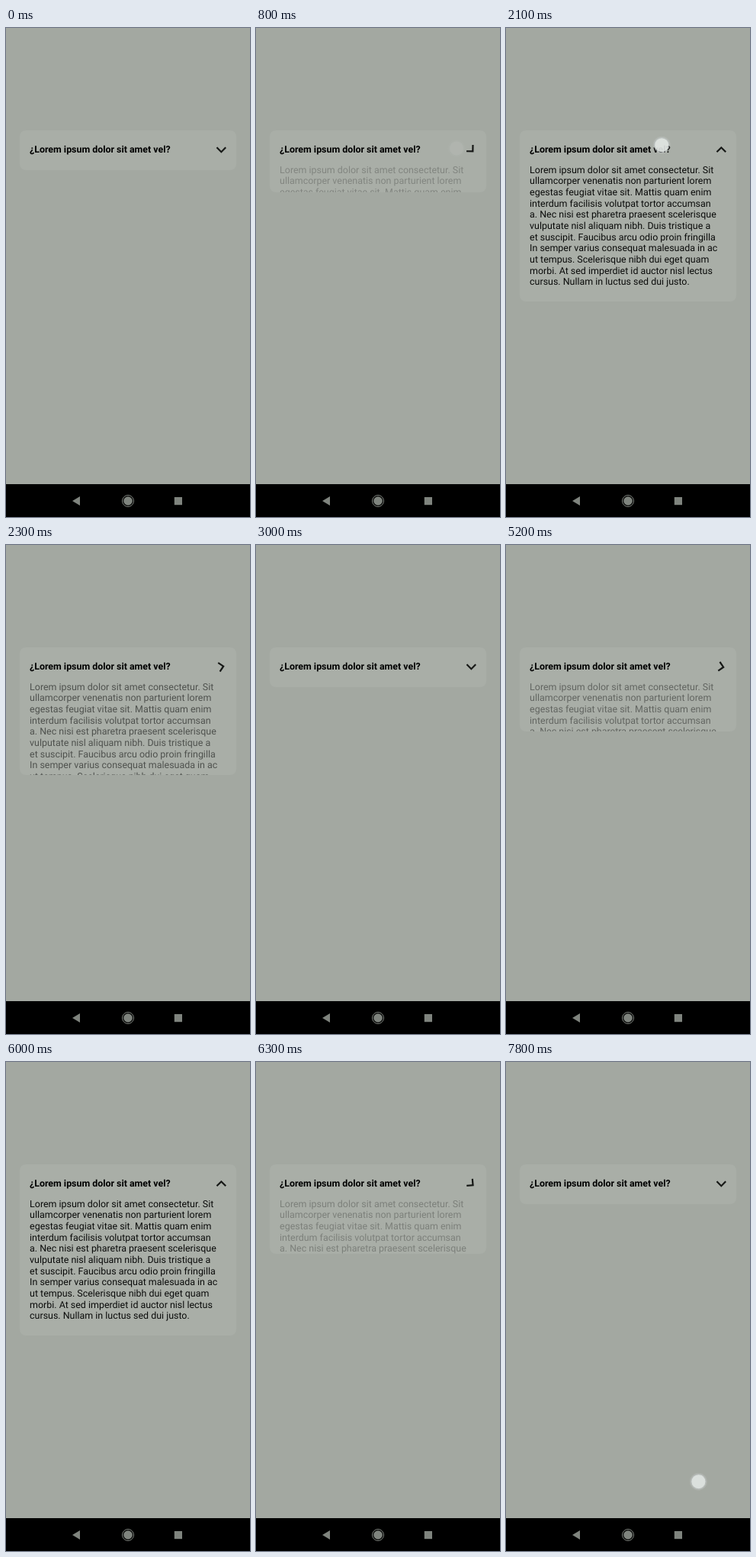
An HTML page for the animation above (7.9 s loop, 320 by 640 pixels).

```html
<!DOCTYPE html>
<html lang="la">
<head>
<meta charset="utf-8">
<title>Accordion</title>
<style>
html, body { margin: 0; width: 100%; height: 100%; overflow: hidden; background: #a3a8a1; }
#stage { position: absolute; left: 0; top: 0; width: 320px; height: 640px; overflow: hidden; background: #a3a8a1; }
#card {
  position: absolute; left: 17.8px; top: 133.5px; width: 284.4px; height: 52.5px;
  border-radius: 8px; background: #a9aea7; overflow: hidden;
  font: 12.444px/14.67px Roboto, "Noto Sans", sans-serif;
  text-rendering: geometricPrecision; white-space: nowrap; color: #0b0c0b;
}
#title { position: absolute; left: 13.3px; top: 19.9px; font-size: 12.38px; font-weight: 700; color: #000; }
#body { position: absolute; left: 13.3px; top: 46.1px; opacity: 0; }
#icon { position: absolute; left: 251.2px; top: 12.9px; width: 26.67px; height: 26.67px; fill: #171917; }
#over { position: absolute; left: 0; top: 0; }
</style>
</head>
<body>
<div id="stage">
  <div id="card">
    <div id="title">¿Lorem ipsum dolor sit amet vel?</div>
    <div id="body">Lorem ipsum dolor sit amet consectetur. Sit<br>
ullamcorper venenatis non parturient lorem<br>
egestas feugiat vitae sit. Mattis quam enim<br>
interdum facilisis volutpat tortor accumsan<br>
a. Nec nisi est pharetra praesent scelerisque<br>
vulputate nisl aliquam nibh. Duis tristique a<br>
et suscipit. Faucibus arcu odio proin fringilla<br>
In semper varius consequat malesuada in ac<br>
ut tempus. Scelerisque nibh dui eget quam<br>
morbi. At sed imperdiet id auctor nisl lectus<br>
cursus. Nullam in luctus sed dui justo.</div>
    <svg id="icon" viewBox="0 0 24 24"><path d="M7.41 8.59 12 13.17l4.59-4.58L18 10l-6 6-6-6z"/></svg>
  </div>
  <svg id="over" width="320" height="640">
    <rect y="597" width="320" height="43" fill="#000"/>
    <g fill="#7f847e">
      <path d="M87 619 97 613v12z"/>
      <circle cx="160" cy="619" r="5.8"/>
      <circle cx="160" cy="619" r="7.5" fill="none" stroke="#7f847e"/>
      <rect x="220.8" y="614" width="10.2" height="10.2"/>
    </g>
    <g id="touch" opacity="0">
      <circle r="11.5" fill="#fff" fill-opacity=".1"/>
      <circle r="10.3" fill="#c4c9cc" fill-opacity=".45"/>
      <circle r="9" fill="#e2e6e3" fill-opacity=".85"/>
    </g>
  </svg>
</div>
<script>
const LOOP = 7900, STEP = 100, DURATION = 300;
const CLOSED = 52.5, OPEN = 224.5;
const LAG = 18; // the card height trails the chevron and the fade
const toggles = [
  { at: 695, open: true },
  { at: 2160, open: false },
  { at: 5059, open: true },
  { at: 6112, open: false }
];
const taps = [
  { at: 700, x: 263, y: 157.5 },
  { at: 2100, x: 204.2, y: 153.2 },
  { at: 2800, x: 204.2, y: 153.2 },
  { at: 3400, x: 250, y: 151 },
  { at: 7800, x: 252.4, y: 549.2 }
];
const $ = id => document.getElementById(id);
const card = $("card"), body = $("body"), icon = $("icon"), touch = $("touch");

function ease(t) {
  t = Math.min(1, Math.max(0, t));
  const p = t < 0.5 ? 2 * t * t : 1 - 2 * (1 - t) ** 2;
  return p > 0.98 ? 1 : p;
}

function openness(now) {
  let value = 0;
  for (const { at, open } of toggles) {
    if (now < at) break;
    const p = ease((now - at) / DURATION);
    value = open ? p : 1 - p;
  }
  return value;
}

function draw(now) {
  const p = openness(now);
  card.style.height = CLOSED + (OPEN - CLOSED) * openness(now - LAG) + "px";
  body.style.opacity = p;
  icon.style.transform = `rotate(${-180 * p}deg)`;

  // Each tap shows for one step, then leaves a faint trace for another.
  const tap = taps.find(({ at }) => now >= at && now < at + 2 * STEP);
  touch.setAttribute("opacity", !tap ? 0 : now < tap.at + STEP ? 1 : 0.13);
  if (tap) touch.setAttribute("transform", `translate(${tap.x} ${tap.y})`);
}

const begin = performance.now();
function tick() {
  const time = (performance.now() - begin) % LOOP;
  draw(Math.floor(time / STEP) * STEP);
  requestAnimationFrame(tick);
}
tick();
</script>
</body>
</html>
```
